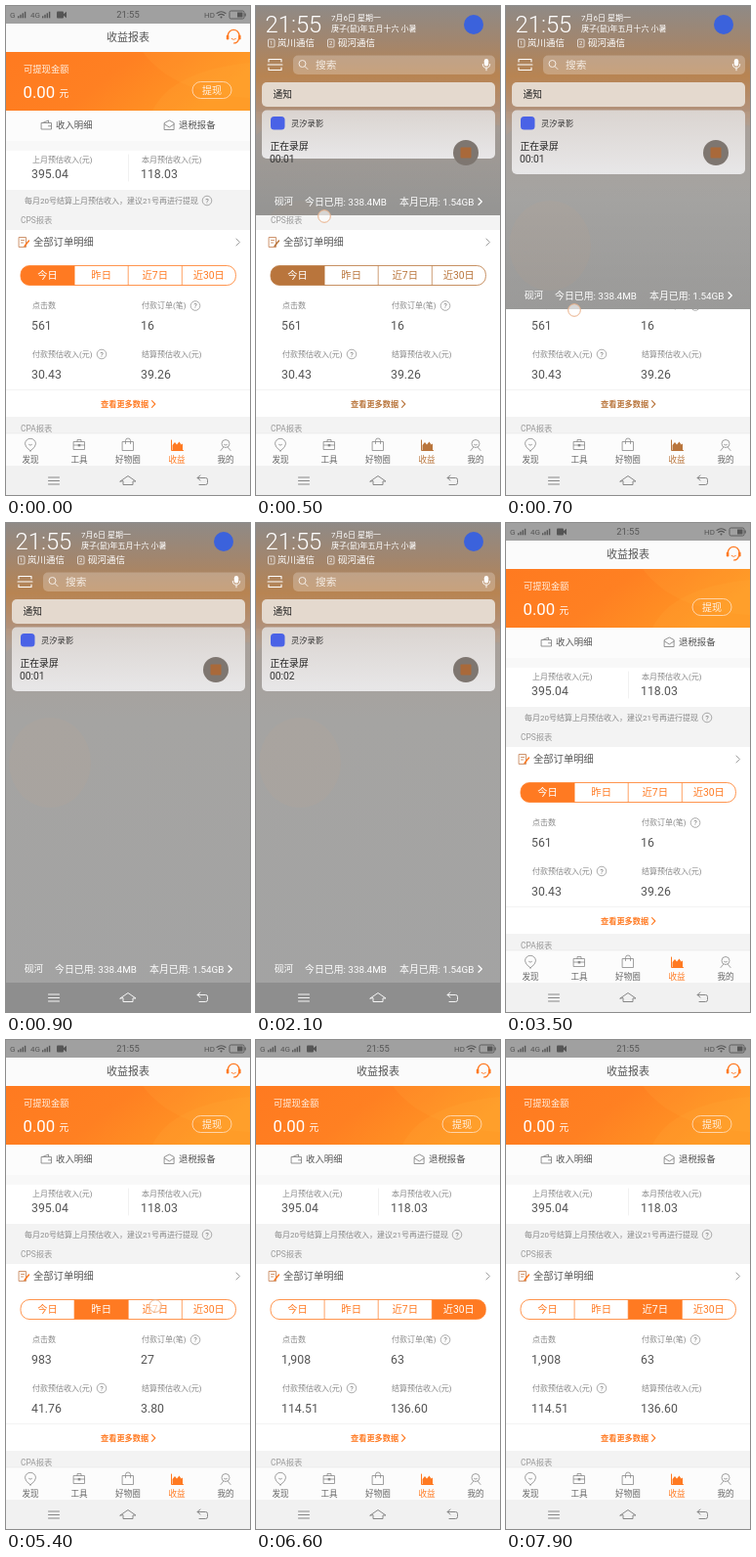
Recreate the animation shown at these times as an HTML page. Size 250 px wide and 500 px high, loop 8000 ms.

```html
<!DOCTYPE html>
<html lang="zh-CN">
<head>
<meta charset="utf-8">
<title>收益报表</title>
<style>
html, body { margin: 0; width: 100%; height: 100%; overflow: hidden; background: #fff; }
svg { display: block; width: 250px; height: 500px; --accent: #ff7a22; }
text { font-family: Roboto, "Noto Sans CJK SC", "Noto Sans CJK", sans-serif; white-space: pre; }
.line { fill: none; stroke-linecap: round; stroke-linejoin: round; }
</style>
</head>
<body>
<svg id="stage" viewBox="0 0 250 500"></svg>
<script>
const ACCENT = 'var(--accent)', DARK = '#555', GREY = '#888', STATUS = '#555', WHITE = '#fff';

// y is the middle of the line of text
const text = (x, y, size, str, fill = DARK, more = '') =>
  `<text x="${x}" y="${y + size * 0.36}" font-size="${size}" fill="${fill}" ${more}>${str}</text>`;
const mid = (x, y, size, str, fill, more = '') =>
  text(x, y, size, str, fill, `text-anchor="middle" ${more}`);
const rect = (x, y, w, h, fill, r = 0, more = '') =>
  `<rect x="${x}" y="${y}" width="${w}" height="${h}" rx="${r}" fill="${fill}" ${more}/>`;
const line = (d, stroke = GREY, w = 0.8) =>
  `<path class="line" d="${d}" stroke="${stroke}" stroke-width="${w}"/>`;
const dot = (x, y, r, fill, more = '') => `<circle cx="${x}" cy="${y}" r="${r}" fill="${fill}" ${more}/>`;
const ring = (x, y, r, stroke = GREY, w = 0.8) =>
  dot(x, y, r, 'none', `stroke="${stroke}" stroke-width="${w}"`);
const help = (x, y) => ring(x, y, 4.8, '#888', 0.7) + mid(x, y, 7.5, '?', '#777');
const chevron = (x, y, stroke, s = 3, w = 1) => line(`M${x} ${y - s}l${s} ${s}l${-s} ${s}`, stroke, w);

const signal = x => [2, 3.5, 5, 6.5].map((h, i) => rect(x + i * 2.3, 12.3 - h, 1.4, h, STATUS)).join('');

function statusBar() {
  return rect(0, 0, 250, 18, '#a0a0a0') +
    text(4, 9, 8, 'G', STATUS) + signal(12) + text(25, 9, 8, '4G', STATUS) + signal(37) +
    rect(52, 5.5, 7, 7, STATUS, 1) + `<path d="M58 9l4-3.200v6.400z" fill="${STATUS}"/>` +
    mid(125, 9, 9.4, '21:55', STATUS) + text(203, 9, 8, 'HD', STATUS) +
    line('M216 7.5q4.5-3.5 9 0M217.6 9.5q2.9-2.2 5.8 0', STATUS, 1.1) + dot(220.5, 11.5, 1, STATUS) +
    rect(229, 5, 15, 8, 'none', 1.5, `stroke="${STATUS}" stroke-width=".9"`) +
    rect(237, 6.5, 5.5, 5, STATUS) + rect(244.5, 7.5, 1.2, 3, STATUS);
}

function header() {
  return rect(0, 18, 250, 29, '#fbfbfb') + mid(125, 32, 11, '收益报表') +
    line('M227.5 31v-1a5.7 5.7 0 0 1 11.4 0v1M238.4 34q-1 4-5 4', ACCENT, 1.2) +
    rect(225.8, 29.5, 2.6, 5, ACCENT, 1.3) + rect(238, 29.5, 2.6, 5, ACCENT, 1.3) +
    line('M231 33.5q2.2 2 4.4 0', ACCENT, 0.9) +
    rect(0, 47, 250, 60, 'url(#banner)') +
    `<path d="M150 107Q170 66 250 58V107z" fill="#ffb040" opacity=".14"/>
     <path d="M140 47Q172 90 250 94V47z" fill="#ffb040" opacity=".12"/>` +
    text(18, 65, 9.3, '可提现金额', '#fff1e4') +
    text(17.5, 88, 16.8, '0.00', WHITE) + text(54.5, 89.5, 9.8, '元', WHITE) +
    rect(191, 77.5, 40, 17, 'none', 8.5, 'stroke="#ffe3c8" stroke-width=".8"') +
    mid(211, 86, 10, '提现', '#fff1e4');
}

function summary() {
  return rect(0, 107, 250, 31, '#fcfcfc') +
    line('M36.5 119.5h10v6.500h-10zM37.500 119.500l6-2.500v2.500M43.500 122.800h3', GREY, 0.9) +
    text(51, 122, 9.4, '收入明细', DARK, 'font-weight="500"') +
    line('M162.500 119.500l4.800-2.500 4.800 2.500v7h-9.600zM162.500 121l4.800 3 4.800-3', GREY, 0.9) +
    text(177, 122, 9.4, '退税报备', DARK, 'font-weight="500"') +
    rect(0, 138, 250, 10, '#f8f8f8') +
    text(27, 157, 8, '上月预估收入(元)', GREY) + text(139, 157, 8, '本月预估收入(元)', GREY) +
    line('M125.5 152v27', '#eee') +
    text(26, 172, 12.3, '395.04') + text(138, 172, 12.3, '118.03') +
    rect(0, 188, 250, 41, '#f3f3f3') +
    text(19, 199, 8, '每月20号结算上月预估收入，建议21号再进行提现', GREY) + help(206, 199) +
    text(15, 219, 8.4, 'CPS报表', '#999') +
    line('M13.5 236.5h7v10h-7zM15.5 239.5h3M15.5 242h2', '#c98a5e', 0.9) +
    line('M19 245.500l4.500-5.500', ACCENT, 1.5) +
    text(28, 241.5, 10.3, '全部订单明细') + chevron(236, 241.5, GREY, 3.5, 0.8);
}

const TABS = ['今日', '昨日', '近7日', '近30日'];
const TAB_W = 55.1;
const VALUES = [
  ['561', '16', '30.43', '39.26'],
  ['983', '27', '41.76', '3.80'],
  ['1,908', '63', '114.51', '136.60']
];

function stats() {
  const labels = TABS.map((s, i) =>
    mid(15 + TAB_W * (i + 0.5), 275.5, 10.3, s, ACCENT, `id="tab${i}"`)).join('');
  const spots = [[26, 327], [138, 327], [26, 377], [138, 377]];
  return rect(15, 265.5, TAB_W, 20, ACCENT, 0, 'id="pick" clip-path="url(#pill)"') +
    rect(15, 265.5, TAB_W * 4, 20, 'none', 9, `stroke="${ACCENT}" stroke-width=".8"`) +
    [1, 2, 3].map(i => line(`M${15 + TAB_W * i} 266v19`, ACCENT, 0.7)).join('') + labels +
    text(27, 306, 8, '点击数', GREY) + text(139, 306, 8, '付款订单(笔)', GREY) + help(194, 306.5) +
    text(27, 356, 8, '付款预估收入(元)', GREY) + help(98, 356) +
    text(139, 356, 8, '结算预估收入(元)', GREY) +
    spots.map(([x, y], i) => text(x, y, 12.3, '', DARK, `id="value${i}"`)).join('') +
    line('M0 392.5h250', '#f0f0f0', 0.8) +
    text(97, 407, 8.2, '查看更多数据', ACCENT, 'font-weight="700"') + chevron(149.5, 407, ACCENT, 3.3, 1.1) +
    rect(0, 420, 250, 17, '#f3f3f3') + text(15, 432, 8.4, 'CPA报表', '#999');
}

function footer() {
  const names = ['发现', '工具', '好物圈', '收益', '我的'];
  return rect(0, 437, 250, 33, '#fcfcfc') + line('M0 437h250', '#e6e6e6', 0.6) +
    line('M25 455q-5.5-4-5.5-7.2a5.5 5.5 0 0 1 11 0q0 3.2-5.5 7.2zM23.5 448.5q1.5 1.6 3 0') +
    line('M69.5 445.5h11v8h-11zM73 445.5v-2h4v2M69.5 449h11') + rect(73.7, 448, 2.6, 2.4, GREY) +
    line('M119.5 445.5h11v9h-11zM122.5 447.5v-3a2.5 2.5 0 0 1 5 0v3') +
    line('M169.500 444v10.500h12', ACCENT, 1) +
    `<path d="M170.500 454v-5l2.500-3 2 2.500 2.500-3 2 3 1.500-1v6.500z" fill="${ACCENT}"/>` +
    ring(225, 447.5, 4) + line('M222.5 451.5l-2.5 3M227.5 451.5l2.5 3M223.5 448.5q1.5 1.4 3 0') +
    names.map((s, i) => mid(25 + 50 * i, 463.5, 8.6, s, i == 3 ? ACCENT : '#666')).join('');
}

function shade() {
  const sim = (x, n) => rect(x, 34, 6.5, 8, 'none', 1, 'stroke="#fff" stroke-width=".7"') +
    mid(x + 3.25, 38, 6, n, WHITE);
  return `<g clip-path="url(#shadeClip)">` +
    rect(0, 0, 250, 500, 'url(#shadeFill)') +
    `<ellipse cx="45" cy="245" rx="42" ry="46" fill="#c0a38c" opacity=".12"/>` +
    `<path d="M0 132Q25 108 50 128T110 130T250 122V108H0z" fill="#c2a184" opacity=".25"/>` +
    rect(0, 0, 250, 130, 'url(#lower)', 0, 'id="dim"') +
    text(9.5, 18.5, 23.8, '21:55', WHITE, 'font-weight="300"') +
    text(77, 12, 8, '7月6日 星期一', WHITE) + text(77, 23, 8, '庚子(鼠)年五月十六 小暑', WHITE) +
    sim(12.5, 1) + text(22, 38, 9.5, '岚川通信', WHITE) +
    sim(73.5, 2) + text(84, 38, 9.5, '砚河通信', WHITE) +
    dot(223, 19, 10, '#3b62dc') +
    line('M13 57v-2.5h13V57M13 63v2.5h13V63M12 60h15', WHITE, 1.1) +
    rect(38, 50.5, 207, 19.5, 'rgba(255,255,255,.24)', 5) +
    ring(47.5, 59, 3.5, '#f4ece4', 1) + line('M50.2 61.8l2.8 2.8', '#f4ece4', 1) +
    text(61, 60, 10.7, '搜索', '#f4ece4') +
    rect(233.8, 54, 4.4, 7.5, WHITE, 2.2) + line('M232.3 59.5a3.7 3.7 0 0 0 7.4 0M236 63.3v2.5', WHITE, 0.9) +
    rect(6, 78, 239, 25, '#e4d9ce', 5) + text(17.5, 91, 9.7, '通知', '#222', 'font-weight="500"') +
    rect(6, 106.5, 239, 65.5, 'url(#cardFill)', 5, 'id="card"') +
    rect(15, 113, 14.5, 13.5, '#4a62e6', 3.5) +
    text(36, 120, 8.3, '灵汐录影', '#333') + text(14.5, 143.5, 9.8, '正在录屏', '#222') +
    text(14, 156.5, 10.3, '', '#333', 'id="count"') +
    dot(215, 150, 13, '#7e7670') + rect(209.5, 144.5, 11, 11, '#a9693a', 1) +
    `<g id="usage">` + text(19, -14, 9.5, '砚河', WHITE) +
    text(50, -14, 9.9, '今日已用: 338.4MB', WHITE) + text(147, -14, 9.9, '本月已用: 1.54GB', WHITE) +
    chevron(228, -14, WHITE, 3.3, 1.3) + `</g></g>`;
}

function navBar() {
  return rect(0, 470, 250, 30, '#f1f1f1', 0, 'id="navBack"') +
    `<g id="navIcons" class="line" stroke="#888" stroke-width="1">
      <path d="M43.5 482h11M43.5 485.5h11M43.5 489h11"/>
      <path d="M117 486l8-5.500 8 5.500h-3v3.500h-10V486z"/>
      <path d="M199 480l-3 2.500 3 2.500M196 482.500h8.500q2 0 2 2v3q0 2-2 2H198"/>
    </g>`;
}

const stops = (list, size) =>
  list.map(([at, c]) => `<stop offset="${at / size}" stop-color="${c}"/>`).join('');
const stage = document.getElementById('stage');
stage.innerHTML = `<defs>
  <linearGradient id="banner" y2=".3">${stops([[0, '#ff7a20'], [1, '#ff8022'], [2, '#ff9824']], 2)}</linearGradient>
  <linearGradient id="shadeFill" x2="0" y2="1">${stops([[0, '#8f8a86'], [35, '#a1866f'], [72, '#b88452'],
    [104, '#b29077'], [125, '#a8a09a'], [200, '#a5a4a2'], [500, '#a3a3a3']], 500)}</linearGradient>
  <linearGradient id="cardFill" x2="0" y2="1">${stops([[0, '#dad4d0'], [1, '#e8e7e8']], 1)}</linearGradient>
  <linearGradient id="lower" x2="0" y2="1"><stop stop-opacity="0"/><stop offset="1" stop-opacity=".18"/></linearGradient>
  <clipPath id="shadeClip"><rect id="clip" width="250" height="0"/></clipPath>
  <clipPath id="pill">${rect(15, 265.5, TAB_W * 4, 20, WHITE, 9)}</clipPath>
  </defs>` + rect(0, 0, 250, 500, WHITE) + statusBar() + header() + summary() + stats() + footer() +
  shade() + navBar() +
  dot(0, 0, 6.3, 'rgba(255,255,255,.6)', 'id="touch" stroke="#eab088" stroke-width="1"');

const $ = id => document.getElementById(id);
const set = (id, attrs) => { for (const k in attrs) $(id).setAttribute(k, attrs[k]); };

// Piecewise linear value at time t through [time, value] points
function along(points, t) {
  if (t <= points[0][0]) return points[0][1];
  for (let i = 1; i < points.length; i++) {
    const [t0, a] = points[i - 1], [t1, b] = points[i];
    if (t <= t1) return a + (b - a) * (t - t0) / (t1 - t0);
  }
  return points.at(-1)[1];
}
const since = (points, t) => points.filter(p => p[0] <= t).at(-1)[1];

const FULL = 470;
const PULL = [[0, 0], [100, 22], [700, 310], [800, 405], [900, FULL], [2100, FULL],
  [2200, 360], [2300, 224], [2400, 130], [2500, 65], [2700, 15], [2900, 0]];
const PICK = [[0, 0], [4000, 1], [5500, 2], [6500, 3], [7800, 2]];
const DATA = [[0, 0], [4100, 1], [5600, 2]];
// start, end, x, y at start, y at end
const TOUCHES = [[100, 800, 70, 23, 359], [2200, 2500, 182.5, 413, 128], [3900, 4100, 98, 275, 275],
  [5300, 5500, 153, 272, 272], [6400, 6600, 209, 275, 275], [7600, 7800, 157.5, 275, 275]];

function draw(t) {
  const h = along(PULL, t), pick = since(PICK, t), open = h >= FULL;
  stage.style.setProperty('--accent', h > 0 ? '#b9753c' : '#ff7a22');
  set('clip', { height: h });
  set('card', { height: Math.max(0, Math.min(65.5, h - 164.5)) });
  set('usage', { transform: `translate(0 ${h})` });
  set('dim', { y: h - 130, opacity: 1 - h / FULL });
  set('navBack', { fill: open ? '#8e8e8e' : '#f1f1f1' });
  set('navIcons', { stroke: open ? '#f4f4f4' : '#888' });
  $('count').textContent = t < 1500 ? '00:01' : '00:02';

  set('pick', { x: 15 + TAB_W * pick });
  TABS.forEach((_, i) => set('tab' + i, { fill: i == pick ? WHITE : ACCENT }));
  VALUES[since(DATA, t)].forEach((v, i) => $('value' + i).textContent = v);

  const hit = TOUCHES.find(([from, to]) => t >= from && t < to);
  set('touch', { visibility: hit ? 'visible' : 'hidden' });
  if (hit) {
    const [from, to, x, y0, y1] = hit;
    set('touch', { cx: x, cy: y0 + (y1 - y0) * (t - from) / (to - from) });
  }
}

const LOOP = 8000, STEP = 100;
const start = performance.now();
let shown = -1;
function tick() {
  const t = Math.floor((performance.now() - start) % LOOP / STEP) * STEP;
  if (t != shown) draw(shown = t);
  requestAnimationFrame(tick);
}
tick();
</script>
</body>
</html>
```
